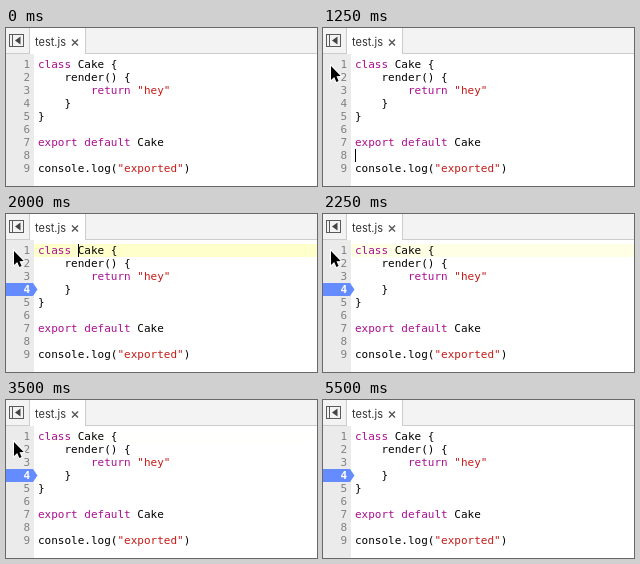
Recreate the animation shown at these times as an HTML page with a canvas. Size 311 by 158 pixels, loop 6000 ms.

```html
<!DOCTYPE html>
<html lang="en">
<head>
<meta charset="utf-8">
<title>Breakpoint demo</title>
<style>
  html, body { margin: 0; width: 100%; height: 100%; overflow: hidden; background: #fff; }
  canvas { display: block; width: 311px; height: 158px; }
</style>
</head>
<body>
<canvas></canvas>
<script>
const W = 311, H = 158, LOOP = 6000, STEP = 250;
const TOP = 30, ROW = 13, GUTTER = 28, TEXT_X = 32;
const MONO = '11px "DejaVu Sans Mono", monospace';
const KEYWORD = '#aa0d91', STRING = '#c41a16', PLAIN = '#000';

// Moments of the scene, in ms.
const FOCUS = 220, ENTER = 500, CLICK = 1700, RESOLVE = 2000, LEAVE = 3250;
const BLINK = 512;

const source = [
  'class Cake {',
  '    render() {',
  '        return "hey"',
  '    }',
  '}',
  '',
  'export default Cake',
  '',
  'console.log("exported")'
];

const rowTop = line => TOP + (line - 1) * ROW;

const canvas = document.querySelector('canvas');
const ctx = canvas.getContext('2d');
const scale = window.devicePixelRatio || 1;
canvas.width = W * scale;
canvas.height = H * scale;

function rect(x, y, w, h, color) {
  ctx.fillStyle = color;
  ctx.fillRect(x, y, w, h);
}

function text(str, x, y, color, font = MONO, align = 'left') {
  ctx.font = font;
  ctx.textAlign = align;
  ctx.fillStyle = color;
  ctx.fillText(str, x, y);
}

function polygon(points, fill, stroke, lineWidth = 1) {
  ctx.beginPath();
  points.forEach(([x, y]) => ctx.lineTo(x, y));
  ctx.closePath();
  if (stroke) {
    ctx.strokeStyle = stroke;
    ctx.lineWidth = lineWidth;
    ctx.stroke();
  }
  ctx.fillStyle = fill;
  ctx.fill();
}

function drawTabs() {
  rect(0, 0, W, 26, '#f3f3f3');
  rect(0, 25, W, 1, '#ccc');
  rect(24, 0, 55, 26, '#fff');
  rect(23, 0, 1, 26, '#ccc');
  rect(79, 0, 1, 26, '#ccc');

  ctx.strokeStyle = '#5a5a5a';
  ctx.lineWidth = 1;
  ctx.strokeRect(3.5, 6.5, 14, 12);
  rect(6, 7, 1, 11, '#5a5a5a');
  polygon([[9, 12.5], [14.5, 8.5], [14.5, 16.5]], '#444');

  text('test.js', 29, 18, '#333', '11px Inter, sans-serif');
  ctx.beginPath();
  for (const dir of [-1, 1]) {
    ctx.moveTo(66, 14.5 - dir * 3);
    ctx.lineTo(72, 14.5 + dir * 3);
  }
  ctx.strokeStyle = '#555';
  ctx.lineWidth = 1.4;
  ctx.stroke();
}

function drawBreakpoint(line) {
  const y = rowTop(line);
  polygon([[0, y], [27, y], [31.5, y + ROW / 2], [27, y + ROW], [0, y + ROW]], '#648cfe');
}

function drawLine(str, line) {
  ctx.font = MONO;
  const charWidth = ctx.measureText('m').width;
  for (const { 0: token, index } of str.matchAll(/"[^"]*"|\w+|[^\s\w"]+/g)) {
    const color = token[0] === '"' ? STRING
      : /^(class|return|export|default)$/.test(token) ? KEYWORD : PLAIN;
    text(token, TEXT_X + index * charWidth, rowTop(line) + 10, color);
  }
}

function drawHighlight(t) {
  if (t < CLICK) return;
  const glow = 105 * 0.5 ** Math.floor((t - CLICK) / STEP);
  rect(GUTTER, TOP, W - GUTTER, ROW, `rgb(255,255,${Math.round(255 - glow)})`);
}

function drawCaret(t) {
  const clicked = t >= CLICK;
  const since = t - (clicked ? CLICK : FOCUS);
  if (since < 0 || Math.floor(since / BLINK) % 2) return;
  rect(clicked ? 72 : TEXT_X, rowTop(clicked ? 1 : 8), 1, ROW, '#000');
}

// The pointer glides in with a decaying speed, rests, then speeds away downwards.
function drawPointer(t) {
  const out = Math.max(0, t - LEAVE) / (2 * STEP);
  if (t < ENTER || out > 1) return;
  const k = (t - ENTER) / STEP;
  const x = Math.round(7 + 62 * 0.1 ** k + 39 * out ** 7);
  const y = Math.round(36 + 86 * 0.19 ** k + 113 * out ** 4.5);
  const shape = [[1, 1], [1, 15], [4.2, 12.1], [6.4, 17], [8.6, 16], [6.5, 11.3], [10.7, 11.1]];
  polygon(shape.map(([px, py]) => [x + px, y + py]), '#000', '#fff', 2);
}

function draw(t) {
  ctx.setTransform(scale, 0, 0, scale, 0, 0);
  rect(0, 0, W, H, '#fff');
  drawTabs();
  rect(0, 26, GUTTER, H - 26, '#ebebeb');
  drawHighlight(t);

  const marked = t < CLICK ? 0 : t < RESOLVE ? 1 : 4;
  if (marked) drawBreakpoint(marked);
  source.forEach((str, i) => {
    const line = i + 1;
    const [color, font] = line === marked ? ['#fff', 'bold ' + MONO] : ['#808080', MONO];
    text(line, 24, rowTop(line) + 10, color, font, 'right');
    drawLine(str, line);
  });

  drawCaret(t);
  drawPointer(t);
}

const origin = performance.now();
function frame() {
  const t = (performance.now() - origin) % LOOP;
  draw(Math.floor(t / STEP) * STEP);
  requestAnimationFrame(frame);
}
frame();
</script>
</body>
</html>
```
